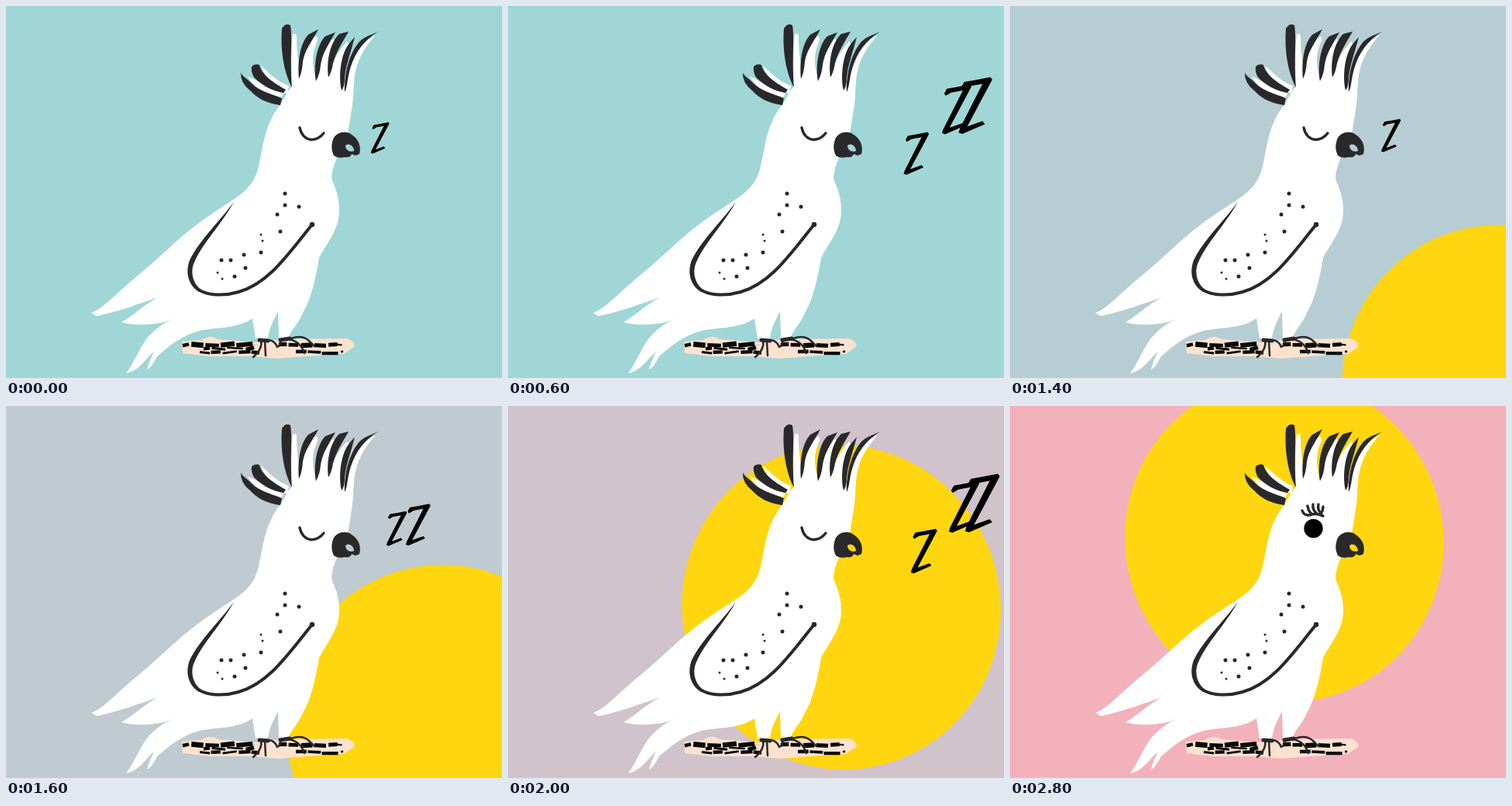
Animation, 640 px wide and 480 px high, one loop 3000 ms. Source, as an HTML page:

```html
<!DOCTYPE html>
<html lang="en">
<head>
<meta charset="utf-8">
<title>Sleepy cockatoo</title>
<style>
  html, body { margin: 0; width: 100%; height: 100%; overflow: hidden; background: #a0d6d6; }
  svg { display: block; width: 100vw; height: 100vh; }
  .white { fill: #fff; }
  .ink { fill: #29292c; }
  .line { fill: none; stroke: #29292c; stroke-linecap: round; stroke-linejoin: round; }
  #bark path { stroke: #080808; }
</style>
</head>
<body>
<svg viewBox="0 0 640 480" preserveAspectRatio="none">
  <rect id="sky" width="640" height="480"/>
  <ellipse id="sun" rx="205" ry="210" fill="#ffd60f"/>

  <path fill="#fbe2cf" d="M227 433 L252 431 Q263 423 273 430 L322 434 L360 430 L440 429 Q452 434 449 440 L436 449 L388 452 L350 455 L318 452 L262 452 L228 448Z"/>
  <g id="bark"></g>

  <path class="white" d="M449 82 L448 118 C446 137 443 151 441 166 C435 184 422 198 420 222
    C422 231 430 241 430 264 C430 288 415 304 404 325 C400 349 394 378 383 396 C377 411 367 418 365 428
    L352 428 L351 394 C345 406 340 414 338 429 L322 429 L318 403
    C298 417 273 414 250 419 C226 425 209 440 195 452 C190 461 187 467 182 469 C184 461 188 452 191 446
    C180 455 173 470 155 474 C166 460 172 440 185 425 C195 415 205 408 215 404
    C199 411 170 414 149 408 C163 401 175 387 196 376 C175 383 140 396 117 400 L110 396
    C126 390 141 372 165 352 C202 323 226 293 275 262 C302 244 319 236 326 207
    C332 181 333 153 355 126 L366 107 L385 94 L408 97 L430 105Z"/>

  <g class="white">
    <path d="M312 91 C322 95 337 105 358 113 L353 122 C335 116 321 106 312 91Z"/>
    <path d="M329 77 C338 84 348 97 365 103 L363 113 C345 106 336 95 329 77Z"/>
    <path d="M370 37 Q375 34 375 40 C375 65 378 80 385 97 L368 108 C369 80 367 61 370 37Z"/>
    <path d="M398 40 Q403 38 402 45 C392 65 396 82 403 101 L378 98 C375 70 385 55 398 40Z"/>
    <path d="M421 43 L426 45 C418 64 414 83 420 102 L397 101 C399 79 407 62 421 43Z"/>
    <path d="M440 46 L444 50 C436 69 431 85 435 108 L414 103 C416 82 425 62 440 46Z"/>
    <path d="M477 37 C463 54 451 70 449 99 L447 114 L434 110 C438 80 448 54 477 37Z"/>
  </g>

  <g class="ink">
    <path d="M303 86 C306 92 312 94 317 100 C327 110 342 113 356 119 L354 128 C335 125 324 119 315 109 Q302 99 303 86Z"/>
    <path d="M317 78 Q321 74 327 76 C330 89 345 99 361 108 L358 112 C342 109 331 103 320 92 Q316 85 317 78Z"/>
    <path d="M356 29 Q361 21 367 25 C370 42 366 67 369 105 C358 85 354 55 356 29Z"/>
    <path d="M403 30 C396 44 385 57 383 72 Q382 86 378 94 C376 73 379 49 390 37Z"/>
    <path d="M425 34 C417 48 408 61 406 76 Q405 88 400 97 C396 76 402 48 412 39Z"/>
    <path d="M442 33 C434 47 426 59 422 74 Q420 86 416 92 C413 70 419 46 430 36Z"/>
    <path d="M450 40 C445 60 438 77 437 93 Q437 104 433 109 C429 93 431 63 443 48Z"/>
    <path d="M480 33 C461 45 451 60 445 78 C440 93 441 104 437 111 C436 88 443 61 456 46 C463 39 470 38 480 33Z"/>
  </g>

  <path class="ink" fill-rule="evenodd" d="M422 172 C427 161 440 161 446 166 C454 171 459 180 456 191 L451 193 L446 191 Q445 196 437 195 Q428 197 423 193 Q418 184 422 172Z
    M438 180 C442 176 449 180 449 187 C445 189 438 187 438 180Z"/>

  <path class="ink" d="M294 253 C276 285 252 307 242 333 C237 348 244 361 252 366 L249 369 C235 360 231 344 237 328 C249 303 272 282 294 253Z"/>
  <g class="line">
    <path stroke-width="4" d="M250 367 C263 374 283 374 300 369 C339 358 364 320 395 282"/>
    <path stroke-width="6.500" d="M395 282h0"/>
    <path stroke-width="5" d="M360 242h0M360 257h0M350 269h0M378 259h0M354 291h0M329 318h0M307 321h0M290 328h0M278 328h0M309 338h0M295 349h0"/>
    <path stroke-width="3" d="M329 295h0M331 303h0M273 344h0M279 352h0"/>
    <path stroke-width="5" d="M327 431 L338 432 M354 431 L366 429"/>
    <path stroke-width="2.500" d="M329 431 C331 440 325 448 319 453 M334 432 L335 451 M339 431 Q347 432 350 440 M355 432 L352 439 M361 430 Q379 430 385 448 M368 429 Q382 424 391 432 L398 439"/>
  </g>

  <path id="asleep" class="line" stroke-width="3.400" d="M379 157 Q382 171 394 172.500 Q404 172 410 164"/>
  <g id="awake">
    <circle cx="391.500" cy="158" r="12.200"/>
    <path class="line" stroke-width="3.400" d="M377 135 Q379 141 386 141 Q395 137 404 142 M384 129 Q385 136 389 139 M391 127 Q390 134 396 139 M398 127 Q396 134 402 139 M404 130 L403 136"/>
  </g>
  <g id="snores"></g>
</svg>

<script>
const LOOP = 3000, STEP = 200;
const byId = id => document.getElementById(id);

function set(node, attrs) {
  for (const key in attrs) node.setAttribute(key, attrs[key]);
}
function addPath(parent, attrs) {
  const node = document.createElementNS('http://www.w3.org/2000/svg', 'path');
  set(node, attrs);
  return parent.appendChild(node);
}
const show = (node, on) => set(node, { visibility: on ? 'visible' : 'hidden' });

let seed = 7;
const random = (min, max) => {
  seed = seed * 16807 % 2147483647;
  return min + seed / 2147483647 * (max - min);
};

// Rough dry-brush dashes along the perch
function brushRow(left, right, y, width) {
  for (let x = left; x < right; x += random(1, 4)) {
    const end = Math.min(right, x + random(8, 22));
    addPath(byId('bark'), {
      d: `M${x} ${y + random(-1.5, 1.5)}L${end} ${y + random(-1.5, 1.5)}`,
      'stroke-width': width * random(0.6, 1.3)
    });
    x = end;
  }
}
for (const [left, right] of [[228, 322], [352, 430]]) {
  brushRow(left, right, 437, 6);
  brushRow(left + 22, right + 5, 447, 3.5);
}
brushRow(255, 320, 442, 4);

// Three brushed letters per breath, each starting one step after the last
const Z = 'M-22 -29L-17 -38L0 -41L26 -46L29 -42L-12 35L13 26L17 31L-20 47L-26 45L-24 38L13 -35L-9 -31L-19 -25Z';
const letters = [0, 1355].flatMap(start =>
  [0, 1, 2].map(order => ({ start, order, node: addPath(byId('snores'), { d: Z }) })));

function drawLetter({ start, order: i, node }, t) {
  const age = t - start;
  const x = 482 - 16 * i - 14 * i * i + (0.2 + 0.01 * i) * age;
  const y = 170 - 21 * i + 26 * i * i - 0.07 * age;
  const height = 40 - 9 * i + 0.054 * age;
  const visible = age >= i * STEP;
  show(node, visible);
  if (visible) set(node, { transform: `translate(${x} ${y}) scale(${height / 92})` });
}

// Teal to pink, bowed slightly towards blue on the way
function skyColor(t) {
  const k = Math.min(1, Math.max(0, (t - 900) / 1900));
  const bow = 4 * k * (1 - k);
  return `rgb(${[160 + 83 * k, 214 - 37 * k + 2 * bow, 214 - 26 * k + 5 * bow].map(Math.round)})`;
}

function draw(now) {
  const t = Math.floor(now % LOOP / STEP) * STEP;
  const remaining = Math.max(0, 2224 - t);
  const awake = t >= 2600;
  set(byId('sky'), { fill: skyColor(t) });
  set(byId('sun'), {
    transform: `translate(${354 + 0.34 * remaining} ${173 + 0.387 * remaining}) rotate(-20)`
  });
  letters.forEach(letter => drawLetter(letter, t));
  show(byId('awake'), awake);
  show(byId('asleep'), !awake);
}

const origin = performance.now();
function tick() {
  draw(performance.now() - origin);
  requestAnimationFrame(tick);
}
tick();
</script>
</body>
</html>
```
